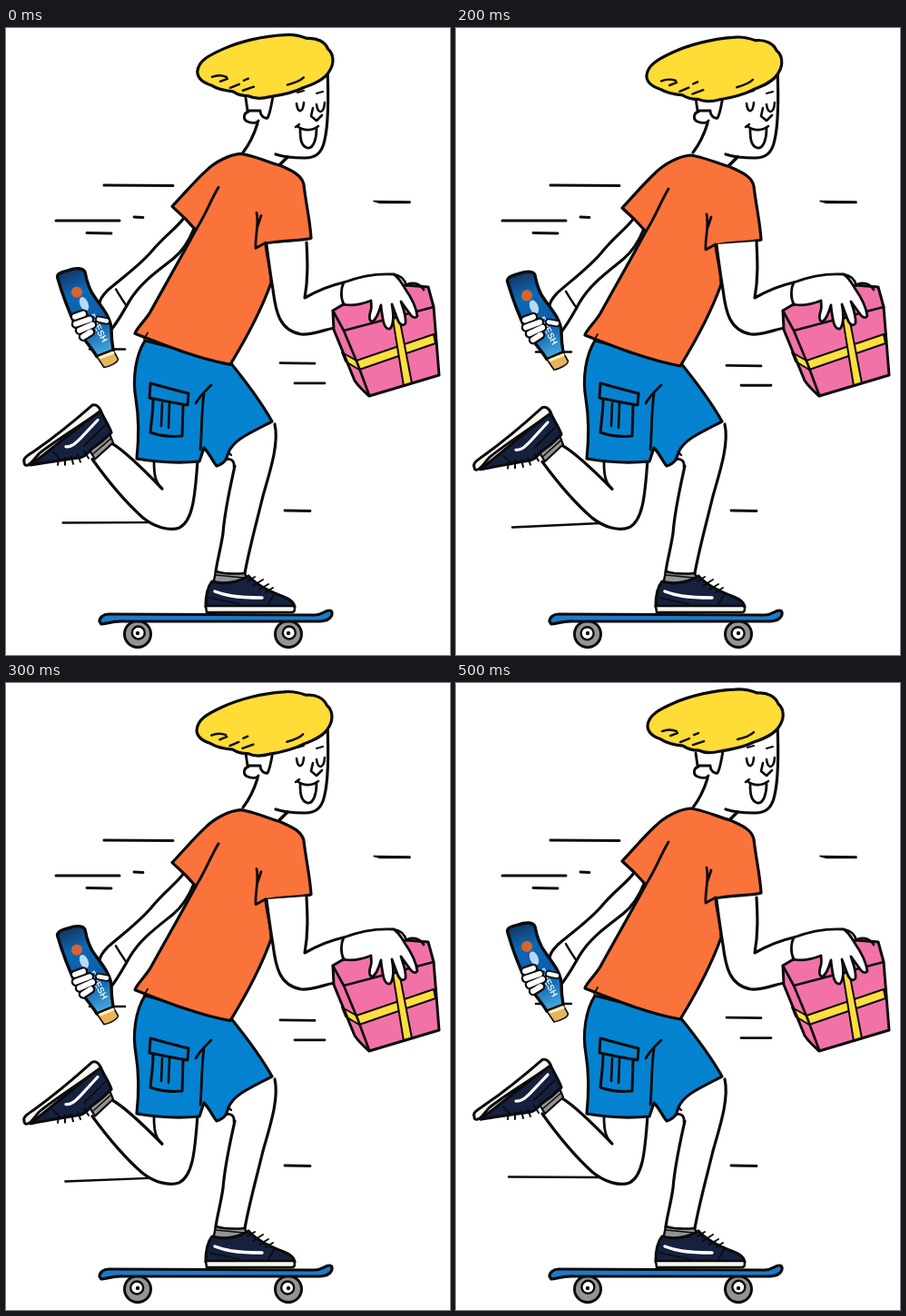
Recreate the animation shown at these times as an HTML page with a canvas. Size 489 by 690 pixels, loop 0.6 s.

```html
<!DOCTYPE html>
<html lang="en">
<head>
<meta charset="utf-8">
<title>Skateboard delivery</title>
<style>
html, body { margin: 0; width: 100%; height: 100%; overflow: hidden; background: #fff; }
canvas { display: block; width: 489px; height: 690px; }
</style>
</head>
<body>
<canvas id="stage"></canvas>
<script>
const W = 489, H = 690, STEP = 100, STEPS = 6;
const INK = '#0b0b0d', SKIN = '#fff', ORANGE = '#fa733a', BLUE = '#0583d0';
const PINK = '#f272a8', YELLOW = '#ffdc36', NAVY = '#16213f', GREY = '#949494', SOLE = '#f8f6ee';

const canvas = document.getElementById('stage');
const ctx = canvas.getContext('2d');
const dpr = window.devicePixelRatio || 1;
canvas.width = W * dpr;
canvas.height = H * dpr;

function shape(d, fill, line = 3.2, color = INK) {
  const p = new Path2D(d);
  if (fill) { ctx.fillStyle = fill; ctx.fill(p); }
  if (line) { ctx.lineWidth = line; ctx.strokeStyle = color; ctx.stroke(p); }
}
const stroke = (d, line, color) => shape(d, null, line, color);

function disc(x, y, r, fill, line = 0) {
  ctx.beginPath();
  ctx.arc(x, y, r, 0, Math.PI * 2);
  ctx.fillStyle = fill;
  ctx.fill();
  if (line) { ctx.lineWidth = line; ctx.strokeStyle = INK; ctx.stroke(); }
}

function group(setup, draw) {
  ctx.save();
  setup();
  draw();
  ctx.restore();
}

// Lowers everything left of x0, more the further away it is.
const swing = (x0, k) => () => ctx.transform(1, -k, 0, 1, 0, k * x0);

function speedLines(bob, shift) {
  group(() => ctx.translate(-shift, 0), () => {
    stroke('M108 173L184 173.5M55 212H125', 3);
    stroke('M141 208L151 208.5M89 225.5L116 226', 2.8);
    shape('M405 190.5L445 191L445 192.5L412 192.5Z', INK, 1.4);
    stroke('M307 531L335 531.5', 2.8);
    const y = 3.5 * bob;
    stroke(`M302 ${368 + y}L340 ${368.5 + y}M318 ${390.5 + y * .8}H351`, 2.8);
    stroke(`M92 ${353 + y}H131`, 2.5);
  });
  const x = 62 - shift + 4 * bob, y = 543.5 + 6 * bob;
  stroke(`M${x} ${y}L158 ${544 + bob}`, 2.4);
}

function backArm() {
  shape('M198 209C188 220 174 229 160 246C146 262 128 272 112 285C106 292 103 298 104 304L116 322L114 334C124 322 130 310 136 300C148 280 166 268 184 254C194 246 201 236 207 221Z', SKIN, 0);
  stroke('M196 209C188 220 174 229 160 246C146 262 126 276 112 288C106 294 103 298 103 303');
  stroke('M207 221C201 236 194 246 184 254C166 268 148 280 136 300C130 310 124 322 114 334');
  stroke('M121 287C125 294 129 300 133 306', 2.4);
  bottle();
}

function bottle() {
  const g = ctx.createLinearGradient(70, 266, 108, 360);
  g.addColorStop(0, '#123864');
  g.addColorStop(.25, '#0e68b4');
  g.addColorStop(.65, '#0b5ca8');
  g.addColorStop(1, '#49afe2');
  shape('M57 275C55 270 60 268 68 266C77 263 85 263 87 268C89 279 92 288 98 296C106 307 115 318 116 330C116 342 117 348 118 354L100 361C93 349 84 341 77 328C69 311 62 292 57 275Z', g, 3.4);
  shape('M100 361L118 354L123.5 364C123 368 114 372 108 373Z', '#e9b45a', 1.6);
  stroke('M104 362L118 357', 3, '#fff0c4');
  disc(78, 290, 6, '#d9652d');
  ctx.beginPath();
  ctx.ellipse(86, 303, 4.5, 8, -.4, 0, Math.PI * 2);
  ctx.fillStyle = '#b7daf3';
  ctx.fill();
  group(() => { ctx.translate(91, 316); ctx.rotate(1.1); }, () => {
    ctx.font = 'bold 10px "Liberation Sans", Arial, sans-serif';
    ctx.fillStyle = '#e5f2fa';
    ctx.fillText('FRESH', 0, 0);
  });
  const fingers = 'M76 317L85 314M77 325L92 320M81 332L95 326M85 339L93 334';
  stroke(fingers, 10.5);
  stroke(fingers, 6, SKIN);
  const thumb = 'M111 322L102 320';
  stroke(thumb, 8);
  stroke(thumb, 4.5, SKIN);
}

function backLeg() {
  shape('M95 474C110 495 130 520 150 538C163 550 180 554 191 550C205 543 208 520 211 476L163 476L172 508C150 484 132 466 117 457Z', SKIN, 0);
  stroke('M95 474C110 495 130 520 150 538C163 549 180 554 191 550C205 543 208 520 211 476');
  stroke('M117 457C132 466 150 484 172 507');
  stroke('M163 477C163 490 164 499 171 506', 2.8);
  shape('M92 464L114 446L118 456L98 474Z', GREY, 2.2);
  stroke('M95 469L116 451', 1.5);
  shape('M104 420C107 428 114 438 116 445C108 453 100 459 94 463C90 467 88 471 82 472C65 474 48 477 27 480Z', NAVY);
  stroke('M66 460C72 461 77 456 82 451L101 431', 3.2, '#fff');
  stroke('M86 459L109 437M52 466L60 474', 1.7);
  stroke('M58 473L57 480M65 472L65 480M72 471L74 479M79 469L82 477M86 465L91 473', 2);
  shape('M20 477C18 472 25 469 32 464C54 449 76 431 95 414.5C100 413 104 418 104 421C84 436 56 452 37 467C32 472 28 479 24 480C21 481 20 479 20 477Z', SOLE, 3);
}

function frontLeg() {
  shape('M246 468C246 500 236 560 231 599L263 601C268 570 277 540 283 515C290 490 301 460 296 436Z', SKIN, 0);
  stroke('M252 482C247 505 241 530 239 556C236 576 232 588 231 599');
  stroke('M296 436C301 458 290 490 283 515C277 540 268 572 263 600');
  stroke('M242 475C247 473 252 476 251 483', 2.8);
  shape('M231 598C241 601 252 601 263 600L266 608L228 613Z', GREY, 2.4);
  stroke('M231 602L262 605', 1.5);
  shape('M227 609C241 613 256 610 267 603C274 611 290 620 306 626C314 629 317 633 318 637H220C220 626 222 615 227 609Z', NAVY);
  stroke('M230 620C240 624 252 627 282 627', 3.4, '#fff');
  stroke('M224 627L257 634M296 622L288 636', 1.7);
  stroke('M266 609L274 604M272 614L283 607M279 618L289 612M286 621L294 616', 2);
  shape('M220 636H317C319 639 318 643 315 643H221Z', SOLE, 2.5);
}

function board(k) {
  for (const x of [145, 311]) {
    disc(x, 667, 14.5, GREY, 3);
    const a = k * Math.PI / 3;
    disc(x + .8 * Math.cos(a), 665.5 + .8 * Math.sin(a), 7, '#fff', 2.4);
    disc(x, 666, 2.2, INK);
  }
  shape('M103 653C103 649 107 645 113 645L340 646C348 646 351 641 356 641C360 641 360 646 357 649C353 653 347 653 340 653H130C118 652 110 656 105 656Z', '#1b7bc9', 3.2);
}

function shorts() {
  shape('M153 344C143 360 139 385 143 408C147 432 146 455 144 474C167 478 192 479 213 477L218 462C224 468 227 476 232 482C243 478 243 473 245 467C251 453 266 447 293 433C283 415 268 394 247 368Z', BLUE);
  stroke('M226 393C221 398 214 404 209 413M218 403C215 422 216 444 214 464', 2.8);
  stroke('M245 467L248 470', 2.4);
  shape('M159 391C174 395 188 399 201 402L200 415C186 413 173 410 158 407Z', null, 3);
  stroke('M162 409C162 422 160 434 159 445C170 449 184 450 194 449L195 416', 3);
  stroke('M172 413L171 438M180 414L179 440', 2.6);
}

function shirt() {
  shape('M258 138C270 139 288 147 302 151C316 157 326 162 328 172C330 191 335 212 336 231C328 234 304 233 286 237C287 251 292 264 292 280C282 308 266 339 247 370C214 364 180 351 142 336C143 331 153 322 159 312C175 283 194 250 209 222L197 209L183 196C198 180 208 168 220 157C230 147 246 139 258 138Z', ORANGE);
  stroke('M234 175C225 190 219 207 209 222', 2.9);
  stroke('M276 203C279 216 274 230 275 242L286 236M281 206L277 218', 2.8);
  stroke('M156 335L152 342', 1.8);
}

function face() {
  shape('M268 70L266 92C260 98 264 105 277 104C273 118 268 128 261 138L301 151L310 142C340 146 348 135 350 121C354 104 355 70 354 45Z', SKIN, 0);
  stroke('M354 45C355 70 355 106 351 123C348 138 341 143 329 143C317 143 306 142 297 139');
  stroke('M264 77L266 91M267 92C261 94 261 101 266 103C271 105 277 105 278 102', 2.9);
  stroke('M267 91L280 91C280 96 284 100 288 99C291 94 292 86 294 75', 2.9);
  stroke('M277 105C273 118 268 128 261 137');
  stroke('M310 142L301 151', 3.6);
  stroke('M320 83C321 94 327 94 328 82M342 84C343 95 350 95 351 82', 2.6);
  stroke('M321 71L328 69M342 72L349 70', 2.2);
  stroke('M338 88L336 97L342 102L348 96', 2.6);
  shape('M324 111C324 122 325 130 332 132C339 133 342 121 342 111Z', SKIN, 0);
  stroke('M319 109L323 106M321 108C328 114 338 113 344 108', 2.6);
  stroke('M324 112C324 122 325 130 332 132C339 133 342 121 342 111', 2.8);
}

function hair() {
  shape('M211 47C212 35 224 29 240 22C258 14 284 8 307 7C318 6 327 9 332 11C343 10 352 15 355 23C361 28 362 38 357 46C352 56 340 61 328 65C318 70 305 73 291 75C283 77 273 77 267 74C258 74 253 71 250 69C240 68 232 66 226 62C217 59 211 54 211 47Z', YELLOW);
  stroke('M227 53C232 51 238 51 243 53M236 58L244 55M247 65L257 61M261 68L273 64M262 57L267 55M310 62C318 60 324 58 328 54', 2.4);
}

function frontArm() {
  shape('M287 238C289 255 291 270 294 288C297 312 301 333 325 337C338 338 350 332 362 330L372 280C358 283 345 288 329 297C332 275 332 255 330 235Z', SKIN, 0);
  stroke('M287 239C289 255 291 270 294 288C297 312 301 333 325 337C338 338 350 332 362 330');
  stroke('M331 236C332 255 333 275 329 297C345 288 358 283 372 280');
}

function gift() {
  const outline = 'M360 311L370 305L440 283L465 285L471 307L477 382L400 405C392 398 386 391 384 388L361 332Z';
  shape(outline, PINK, 0);
  shape('M370 357L386 366L471 337L473 347L389 376L374 367Z', '#ffdf3d', 2);
  shape('M426 320L433 318L447 391L438 394Z', '#ffdf3d', 2);
  stroke(outline, 3);
  stroke('M360 311L372 333L471 307M372 333L387 369L400 404', 2.7);
  stroke('M439 284C446 278 456 281 460 288', 2.7);
}

function hand() {
  shape('M372 280C390 273 410 270 427 271C433 275 436 281 439 286C446 296 452 308 453 317C450 321 446 317 443 312C440 308 437 304 435 301C438 310 441 318 440 325C437 329 433 326 431 320L425 304C427 315 427 326 423 331C418 332 416 326 415 320C414 314 413 308 413 305C411 312 408 320 404 323C399 323 400 316 402 310C403 306 402 303 402 300C392 304 380 306 372 304C368 296 369 286 372 280Z', SKIN, 2.8);
  stroke('M427 271C434 272 439 277 441 283', 2.7);
}

function draw(k) {
  const bob = (1 + Math.cos((k - 2.2) * Math.PI / 3)) / 2;
  const shift = [1, 2, 5].includes(k) ? 4 : 0;
  ctx.setTransform(dpr, 0, 0, dpr, 0, 0);
  ctx.fillStyle = '#fff';
  ctx.fillRect(0, 0, W, H);
  ctx.lineCap = ctx.lineJoin = 'round';

  speedLines(bob, shift);
  group(swing(200, .036 * bob), backArm);
  group(swing(180, .038 * bob), backLeg);
  board(k);
  frontLeg();
  shorts();
  face();
  group(() => ctx.translate(0, 2 * bob), shirt);
  group(() => {
    ctx.translate(360 - 1.5 * bob, 35 + 2 * bob);
    ctx.rotate(-.026 * bob);
    ctx.translate(-360, -35);
  }, hair);
  frontArm();
  gift();
  hand();
}

const start = performance.now();
function tick() {
  draw(Math.floor((performance.now() - start) / STEP) % STEPS);
  requestAnimationFrame(tick);
}
tick();
</script>
</body>
</html>
```
